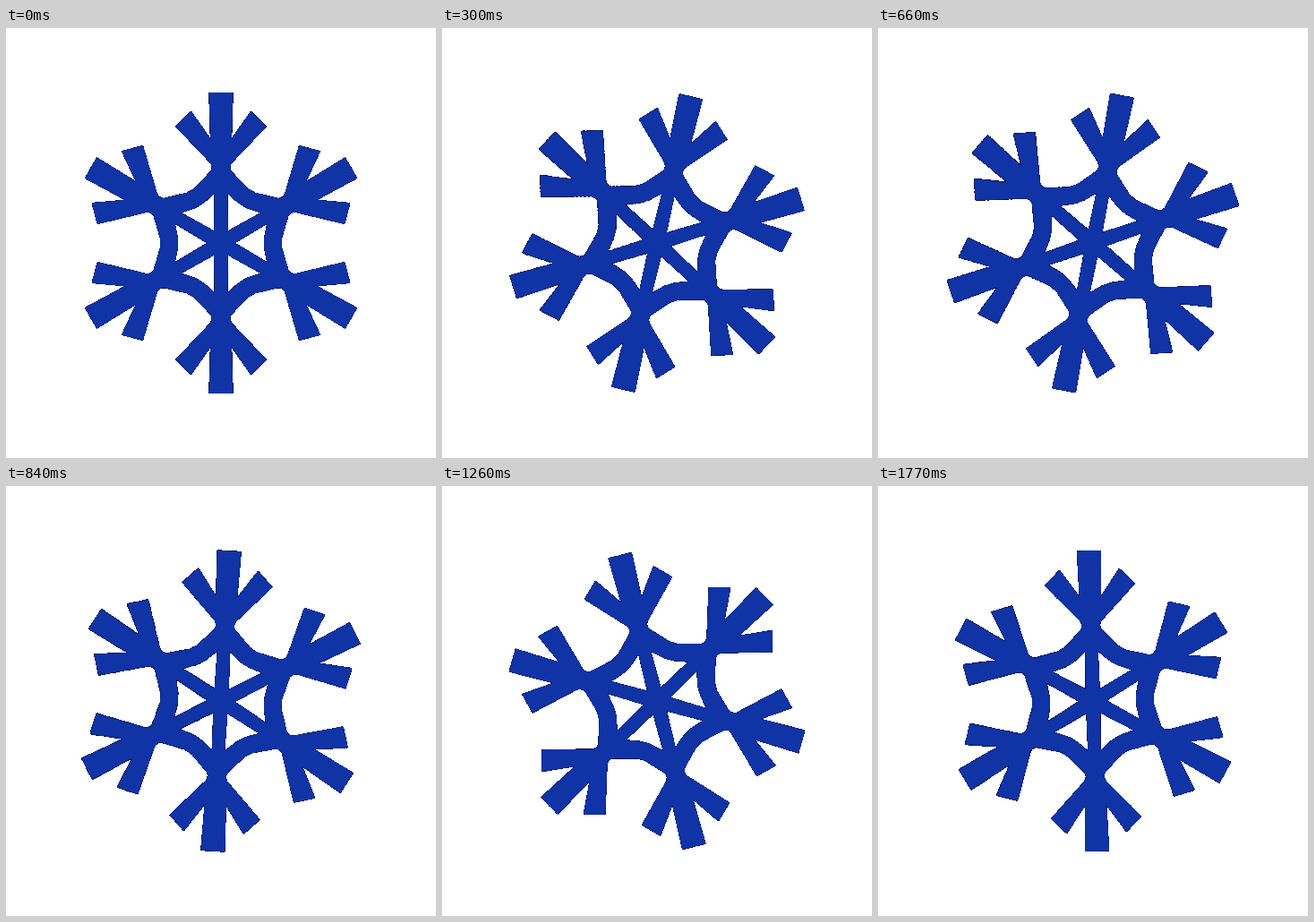
Recreate the animation shown at these times as an HTML page. Size 480x480 px, loop 1800 ms.

```html
<!DOCTYPE html>
<html lang="en">
<head>
<meta charset="utf-8">
<title>Swaying snowflake</title>
<style>
  @property --phase {
    syntax: "<angle>";
    inherits: false;
    initial-value: 0deg;
  }
  html, body {
    margin: 0;
    width: 100%;
    height: 100%;
    overflow: hidden;
    background: #fff;
  }
  svg {
    display: block;
    width: 100%;
    height: 100%;
  }
  .flake {
    fill: #1034a6;
    stroke: #1034a6;
    stroke-width: 2;
    stroke-linejoin: round;
    transform: rotate(calc(15deg * sin(var(--phase))));
    animation: sway 1800ms steps(60) infinite;
  }
  @keyframes sway {
    from { --phase: 0deg; }
    to { --phase: 360deg; }
  }
</style>
</head>
<body>
<svg viewBox="0 0 480 480">
  <defs>
    <!-- Hard silhouette whose partly covered edge pixels darken to black -->
    <filter id="edge" filterUnits="userSpaceOnUse" x="-240" y="-240" width="480" height="480" color-interpolation-filters="sRGB">
      <feComponentTransfer in="SourceAlpha" result="mask">
        <feFuncA type="discrete" tableValues="0 1 1 1"/>
      </feComponentTransfer>
      <feComposite in="SourceGraphic" in2="mask" operator="atop"/>
    </filter>
    <path id="half" d="M0 0 L7-12 L6.3-57 L19.5-45.5 L24.5-42.5 L33.4-57.9 L29-60.5 L10.5-80 Q8-85 11.5-90 L49.5-130 L33.5-146 L11-114 L12.6-167 L0-167 Z"/>
    <g id="arm">
      <use href="#half"/>
      <use href="#half" transform="scale(-1 1)"/>
    </g>
  </defs>
  <g transform="translate(240 240)">
    <g filter="url(#edge)">
      <g class="flake">
        <use href="#arm"/>
        <use href="#arm" transform="rotate(60)"/>
        <use href="#arm" transform="rotate(120)"/>
        <use href="#arm" transform="rotate(180)"/>
        <use href="#arm" transform="rotate(240)"/>
        <use href="#arm" transform="rotate(300)"/>
      </g>
    </g>
  </g>
</svg>
</body>
</html>
```
